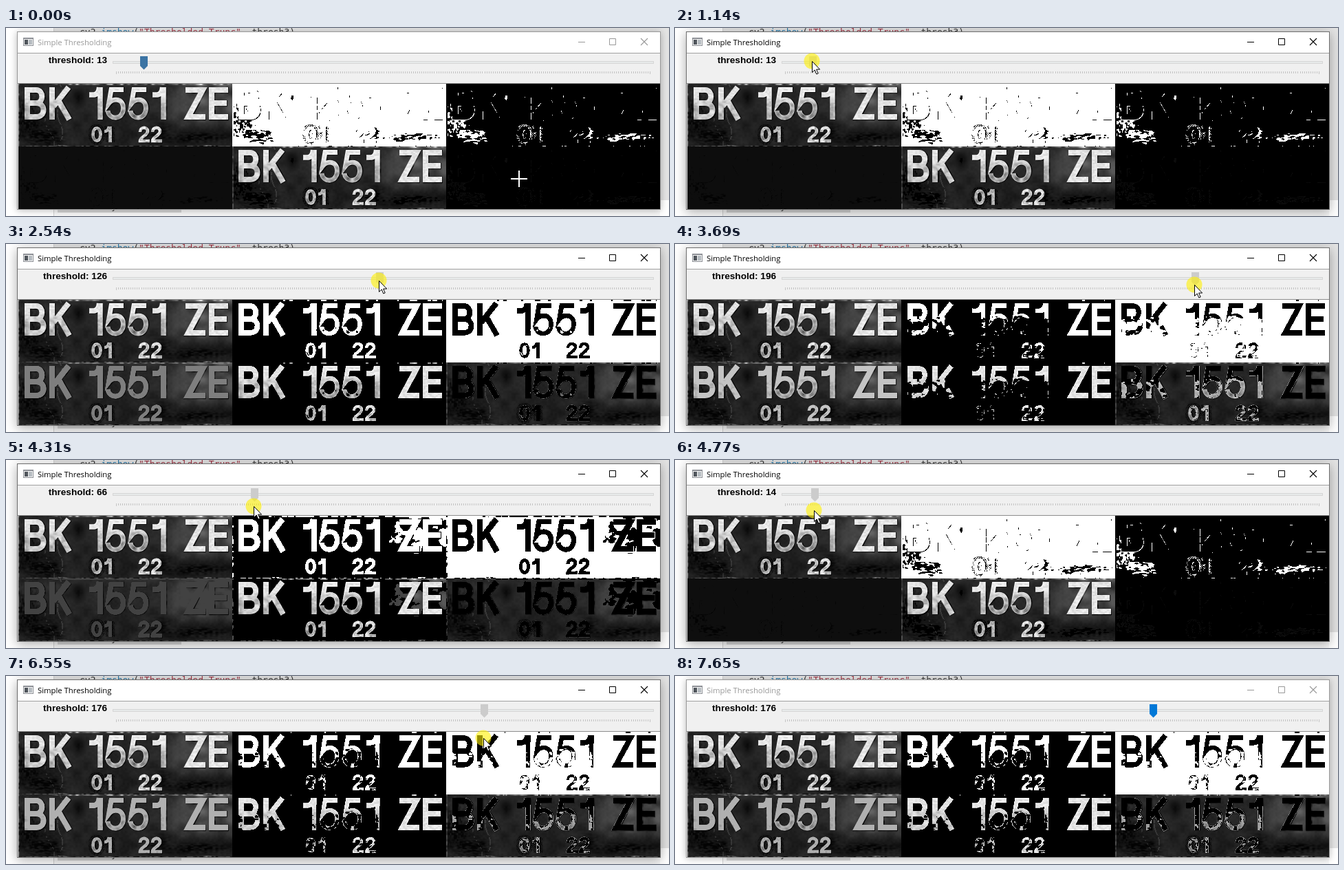
Write an HTML page with a canvas that moves like this. It is 964x273 px and loops after 7800 ms.

```html
<!DOCTYPE html>
<html lang="en">
<head>
<meta charset="utf-8">
<title>Simple Thresholding</title>
<style>
html, body { margin: 0; width: 100%; height: 100%; overflow: hidden; background: #fff; }
canvas { display: block; width: 964px; height: 273px; }
</style>
</head>
<body>
<canvas id="stage" width="964" height="273"></canvas>
<script>
const ctx = document.getElementById('stage').getContext('2d');
const LOOP = 7800, TICK = 77.2;
const W = 311, H = 91, LEFT = 18, TOP = 81;

const clamp = (v, lo, hi) => Math.max(lo, Math.min(hi, v));
const smooth = (a, b, v) => {
  const t = clamp((v - a) / (b - a), 0, 1);
  return t * t * (3 - 2 * t);
};
const mix = (a, b, t) => a + (b - a) * t;

function hash(x, y) {
  let h = Math.imul(x, 374761393) + Math.imul(y, 668265263);
  h = Math.imul(h ^ (h >>> 13), 1274126177);
  return ((h ^ (h >>> 16)) >>> 0) / 4294967295;
}
function noise(x, y) {
  const i = Math.floor(x), j = Math.floor(y);
  const u = smooth(0, 1, x - i), v = smooth(0, 1, y - j);
  return mix(mix(hash(i, j), hash(i + 1, j), u), mix(hash(i, j + 1), hash(i + 1, j + 1), u), v);
}

// Piecewise linear track of [tick, value] pairs.
function track(keys, f) {
  if (f <= keys[0][0]) return keys[0][1];
  for (let i = 1; i < keys.length; i++) {
    const [f0, v0] = keys[i - 1], [f1, v1] = keys[i];
    if (f <= f1) return mix(v0, v1, (f - f0) / (f1 - f0));
  }
  return keys[keys.length - 1][1];
}

// ---- plate picture ----
const ONE = 'M104 17H111Q118 16 118.5 6M120 6V53';
const FIVE = 'M154 9.5H136L132.5 29.5C139 21 153.5 22 153.5 36.5C153.5 54 132.5 54 131 40';
const TWO = 'M178 71C178 63 189 63 189 70C189 76 178 78 178 84H192';
const GLYPHS = [
  ['M14 6V53M14 10H27C38 10 38 29 27 29H14M27 29C41 29 41 49 27 49H14', 0, 8],
  ['M50 6V53M74 6L52 34M59 25L75 53', 0, 8],
  [ONE, 0, 7.4], [FIVE, 0, 6.8], [FIVE, 33, 6.8], [ONE, 92, 7.4],
  ['M244 10H269L248 49H273', 0, 8],
  ['M306 10H282V49H306M282 29H304', 0, 8],
  ['M109.5 74.5C109.5 62.5 120.5 62.5 120.5 74.5C120.5 86.5 109.5 86.5 109.5 74.5', 0, 4.6],
  ['M126 70Q132 70 133 63M134.5 63V86', 0, 4.6],
  [TWO, 0, 4.6], [TWO, 18, 4.6]
];

function glyphMask(extra, shift) {
  const c = document.createElement('canvas');
  c.width = W; c.height = H;
  const g = c.getContext('2d');
  for (const [path, dx, width] of GLYPHS) {
    g.setTransform(1, 0, 0, 1, dx + shift - 1, shift / 2 - 1);
    g.lineWidth = width + extra;
    g.stroke(new Path2D(path));
  }
  const data = g.getImageData(0, 0, W, H).data;
  return i => data[i * 4 + 3] / 255;
}

function backdrop(x, y) {
  const broad = noise(x / 14, y / 12), fine = noise(x / 3 + 50, y / 3);
  const blob = (cx, cy, rx, ry) => Math.exp(-(((x - cx) / rx) ** 2) - ((y - cy) / ry) ** 2);
  let v = 21 + 16 * broad + 7 * fine + 8 * smooth(70, 10, y);
  v += 42 * smooth(205, 250, x) * smooth(68, 45, y) * (0.3 + broad);
  v -= (18 + 18 * fine) * blob(87, 21, 9, 11);
  v -= 44 * noise(x / 2, y / 3) * blob(12, 42, 16, 30);
  v -= 42 * noise(x / 5 + y / 5, y / 2 - x / 9) * blob(36, 76, 26, 14);
  v -= 34 * noise(x / 5 + y / 6, y / 2) * blob(203, 72, 16, 12);
  v -= 38 * noise(x / 4, y / 2) * blob(262, 78, 45, 7);
  if (Math.abs(x - 60 - 4 * Math.sin(y / 9)) < 1 && fine > 0.35) v += 24;
  if (y > 48 && Math.abs(x - 45 - 7 * Math.sin(y / 11)) < 1 && fine > 0.5) v += 22;
  if (x < 2) v += 60 * fine;
  if (y < 2 && x > 35) v += 150 * noise(x / 5, 9) ** 2;
  if (y > 88) v += 150 * (blob(61, 90, 6, 2) + blob(277, 90, 8, 2)) * fine;
  if (y === H - 1) v = 110 * fine;
  return Math.max(3, v);
}

function metal(x, y) {
  const fine = noise(x / 3 + 9, y / 2 + 7), broad = noise(x / 6, y / 5 + 30);
  if (y > 60) return (x < 150 ? 105 : 145) + 120 * fine;
  const low = smooth(16, 36, y);
  const middle = Math.exp(-(((x - 165) / 52) ** 4));
  const left = smooth(80, 60, x);
  return 246 - 34 * fine - low * (middle * (20 + 115 * broad) + left * 85 * broad);
}

function makePlate() {
  const face = glyphMask(0, 0), core = glyphMask(-2.6, 0);
  const edge = glyphMask(1.4, 0.9), halo = glyphMask(9, 0);
  const out = new Uint8ClampedArray(W * H);
  for (let y = 0, i = 0; y < H; y++) {
    for (let x = 0; x < W; x++, i++) {
      const shade = edge(i) * clamp(0.1 + 0.95 * noise(x / 5, y / 5 + 80), 0, 0.9);
      const dots = y > 58 && x < 170 ? 26 * halo(i) * hash(x, y) : 0;
      const rim = 250 - 130 * noise(x / 3, y / 3 + 60) * smooth(10, 40, y);
      const steel = metal(x, y);
      const letter = mix(Math.max(steel, x > 90 && x < 240 ? rim : 0), steel, core(i));
      out[i] = mix(Math.max(3, backdrop(x, y) - dots) * (1 - shade), letter, face(i));
    }
  }
  return out;
}

const plate = makePlate();
const mosaic = ctx.createImageData(W * 3, H * 2);
const MODES = [
  (p, t) => p,
  (p, t) => p > t ? 255 : 0,
  (p, t) => p > t ? 0 : 255,
  (p, t) => Math.min(p, t),
  (p, t) => p > t ? p : 0,
  (p, t) => p > t ? 0 : p
];
let shown = -1;

function updateMosaic(threshold) {
  if (threshold === shown) return;
  shown = threshold;
  const pixels = new Uint32Array(mosaic.data.buffer);
  MODES.forEach((mode, k) => {
    const ox = k % 3 * W, oy = Math.floor(k / 3) * H;
    for (let i = 0; i < plate.length; i++) {
      const g = mode(plate[i], threshold);
      pixels[(oy + Math.floor(i / W)) * W * 3 + ox + i % W] = (0xff000000 | g * 0x010101) >>> 0;
    }
  });
}

// ---- desktop and window ----
function rect(color, x, y, w, h) {
  ctx.fillStyle = color;
  ctx.fillRect(x, y, w, h);
}
function lines(color, width, path) {
  ctx.strokeStyle = color;
  ctx.lineWidth = width;
  ctx.stroke(new Path2D(path));
}
function label(text, x, y, font, color, align = 'left') {
  ctx.font = font;
  ctx.fillStyle = color;
  ctx.textAlign = align;
  ctx.fillText(text, x, y);
}

function drawEditor() {
  const mono = '13px "DejaVu Sans Mono", monospace';
  rect('#fff', 0, 0, 964, 273);
  rect('#e4e4e4', 69, 0, 895, 250);
  rect('#f7f7f7', 69, 250, 882, 23);
  rect('#d2d2d2', 69, 0, 1, 273);
  rect('#d4d4d4', 75, 255, 180, 13);
  label('cv2.', 107, 10, mono, '#333');
  label('imshow', 138.3, 10, mono, '#2277aa');
  label('(', 185.3, 10, mono, '#333');
  label('"Thresholded Trunc"', 193.1, 10, mono, '#a03040');
  label(', thresh3)', 341.8, 10, mono, '#333');
  label('cv2.destroyAllWindows()', 75, 263, mono, '#333');
}

function drawWindow(active) {
  ctx.save();
  ctx.shadowColor = active ? 'rgba(0,0,0,.34)' : 'rgba(0,0,0,.28)';
  ctx.shadowBlur = active ? 16 : 10;
  ctx.shadowOffsetY = active ? 3 : 1;
  rect(active ? '#6e6e6e' : '#999', 16, 5, 936, 259);
  ctx.restore();
  rect('#fff', 17, 6, 934, 30);
  rect('#a0a0a0', 17, 36, 934, 1);
  rect('#f0f0f0', 17, 37, 934, 43);
  rect('#8c8c8c', 17, 80, 934, 1);
  rect('#f0f0f0', 17, 81, 1, 182);

  rect('#8d9096', 25, 14, 15, 12);
  rect('#f4f4f4', 26, 16, 13, 9);
  rect('#50565c', 27, 17, 5, 7);
  rect('#b5bbc0', 33, 17, 5, 7);

  const ink = active ? '#000' : '#999';
  label('Simple Thresholding', 46, 25, '11.3px "Open Sans", sans-serif', ink);
  lines(ink, 1, 'M832 20.5H842M877.5 15.5H886.5V24.5H877.5Z');
  lines(ink, 1.1, 'M923 15L933 25M933 15L923 25');
}

const thumbX = v => 161 + 3.04 * v;

function drawSlider(value, color) {
  label('threshold: ' + value, 147, 51, 'bold 13.6px "Liberation Sans", Arial, sans-serif', '#000', 'right');
  rect('#d6d6d6', 155, 48, 787, 4);
  rect('#e7eaea', 156, 49, 785, 2);
  for (let i = 0; i < 256; i++) rect('#c4c4c4', Math.round(160 + i * 3.0427), 63, 1, i % 255 ? 3 : 4);
  const x = Math.round(thumbX(value)) - 6;
  ctx.fillStyle = color;
  ctx.fill(new Path2D(`M${x} 41h11v14l-5.5 5.5l-5.5 -5.5z`));
}

function drawCursor(x, y, pressed) {
  if (pressed) {
    ctx.fillStyle = 'rgba(255,240,0,.6)';
    ctx.beginPath();
    ctx.arc(x, y, 11.5, 0, Math.PI * 2);
    ctx.fill();
  }
  if (!pressed && y > TOP && y < 263) {
    rect('#fff', x - 12, y - 1, 24, 2);
    rect('#fff', x - 1, y - 12, 2, 24);
    return;
  }
  const arrow = new Path2D(`M${x + .5} ${y + .5}v16l3.7 -3.5l2.6 6l2.4 -1l-2.6 -5.9h5z`);
  ctx.fillStyle = '#fff';
  ctx.fill(arrow);
  ctx.strokeStyle = '#000';
  ctx.lineWidth = 1;
  ctx.stroke(arrow);
}

// ---- timeline, in ticks ----
const VALUE = [[17, 13], [23, 54], [33, 126], [43, 196], [48, 196], [56, 66], [62, 14], [64, 9], [66, 9], [75, 120], [85, 176]];
const DRAG_Y = [[15, 48], [23, 52], [33, 53], [43, 58], [48, 59], [62, 73], [75, 80], [85, 90]];
const EXIT_X = [[85, 697], [88, 721], [95, 897]];
const EXIT_Y = [[85, 90], [88, 100], [95, 292]];
const PRESS = 15, RELEASE = 86;

function cursorAt(f, value) {
  if (f >= RELEASE) return [track(EXIT_X, f), track(EXIT_Y, f)];
  if (f >= PRESS) return [thumbX(value) - 2, track(DRAG_Y, f)];
  const t = smooth(0, 11, f), s = 1 - t;
  const curve = (a, b, c) => a * s * s + 2 * b * s * t + c * t * t;
  return [curve(746, 430, 199), curve(219, -105, 45)];
}

function thumbColor(f) {
  if (f >= RELEASE) return '#0078d7';
  if (f >= PRESS) return '#cccccc';
  return f >= 10 ? '#171717' : '#3c74a4';
}

function draw(time) {
  const f = Math.floor((time % LOOP + 27) / TICK);
  const value = Math.round(track(VALUE, f));
  drawEditor();
  drawWindow(f >= 14 && f < 99);
  drawSlider(value, thumbColor(f));
  updateMosaic(value);
  ctx.putImageData(mosaic, LEFT, TOP);
  const [x, y] = cursorAt(f, value);
  drawCursor(Math.round(x), Math.round(y), f >= PRESS && f < RELEASE);
}

const start = performance.now();
function loop() {
  draw(performance.now() - start);
  requestAnimationFrame(loop);
}
loop();
</script>
</body>
</html>
```
